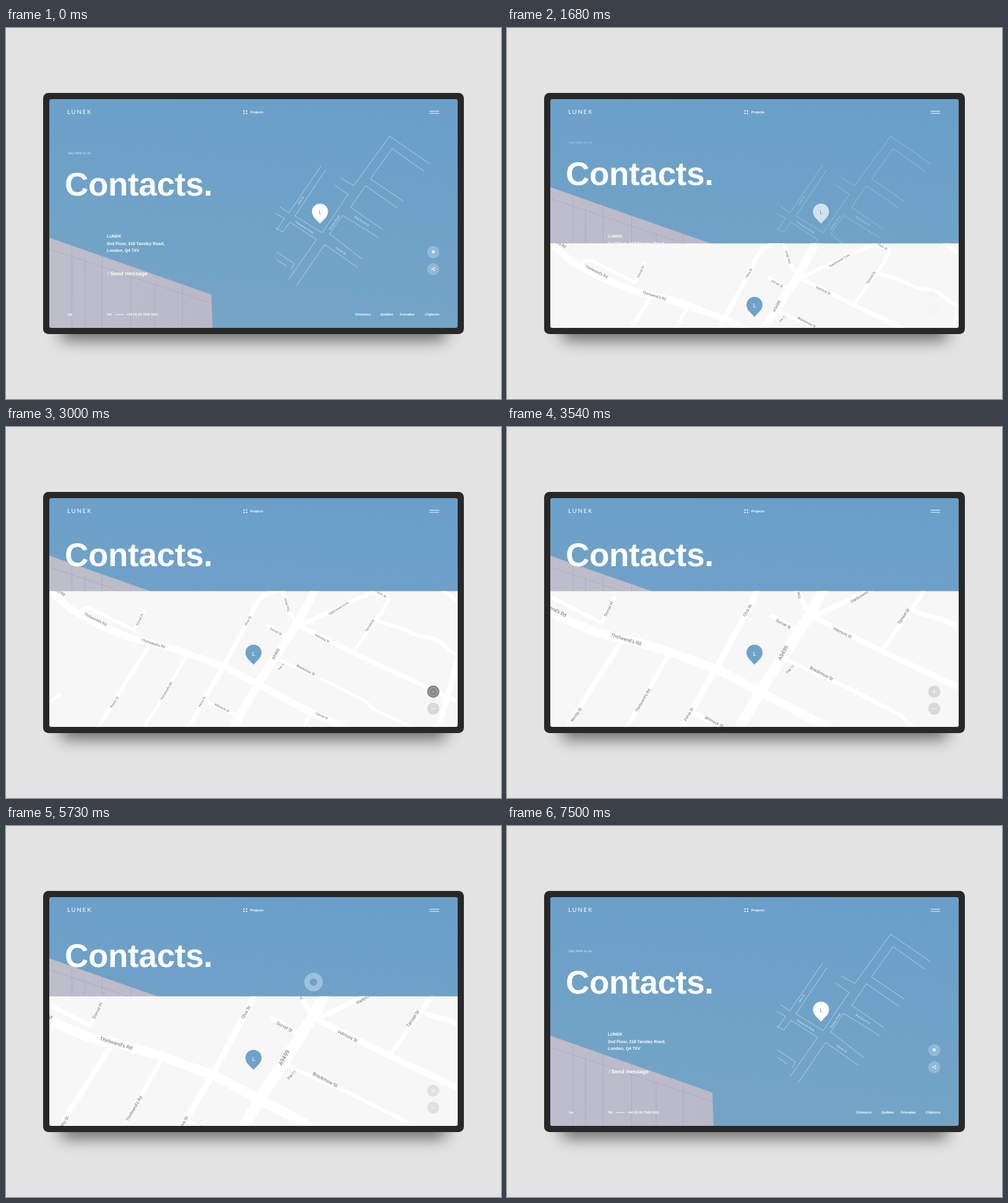
Animation, 800 px wide and 600 px high, one loop 8.1 s. Source, as an HTML page:

```html
<!DOCTYPE html>
<html lang="en">
<head>
<meta charset="utf-8">
<title>Contacts</title>
<style>
  html, body { margin: 0; width: 100%; height: 100%; overflow: hidden; background: #e3e3e3; }
  svg { display: block; width: 800px; height: 600px; text-rendering: geometricPrecision; }
  text { font-family: "Liberation Sans", Arial, sans-serif; }
  .ui { fill: #fff; font-weight: bold; }
  .mini path { fill: none; stroke: #fff; stroke-width: .75; opacity: .62; }
  .mini text { fill: #fff; opacity: .8; font-size: 4.6px; text-anchor: middle; }
  .roads { fill: none; stroke: #fff; stroke-linejoin: round; stroke-linecap: round; }
  .names text { font-family: Roboto, sans-serif; fill: #6c6c6c; text-anchor: middle; }
  .initial { font: 9px Lato, sans-serif; text-anchor: middle; }
  .seams path { fill: none; stroke: #a09fb2; stroke-width: .7; opacity: .75; }
</style>
</head>
<body>
<svg viewBox="0 0 800 600">
  <defs>
    <linearGradient id="sky" x1=".65" y1="0" x2=".45" y2="1">
      <stop offset="0" stop-color="#6a9fc9"/>
      <stop offset="1" stop-color="#74a5c6"/>
    </linearGradient>
    <linearGradient id="wall" x1="0" y1="0" x2="1" y2="0">
      <stop offset="0" stop-color="#bebdcc"/>
      <stop offset="1" stop-color="#b9b9c8"/>
    </linearGradient>
    <filter id="soft" x="-20%" y="-100%" width="140%" height="300%"><feGaussianBlur stdDeviation="13 12"/></filter>
    <clipPath id="screen"><rect x="70" y="115" width="660" height="370" rx="3.5"/></clipPath>
    <path id="pin" d="M0 19.5C-4 14-13 9-13 0A13 13 0 0 1 13 0C13 9 4 14 0 19.5Z"/>
  </defs>

  <rect width="800" height="600" fill="#e3e3e3"/>
  <rect x="88" y="440" width="624" height="66" rx="10" fill="#000" opacity=".5" filter="url(#soft)"/>
  <rect x="60" y="105" width="680" height="390" rx="8.5" fill="#282828"/>

  <g clip-path="url(#screen)">
    <rect x="70" y="115" width="660" height="370" fill="url(#sky)"/>

    <g id="building">
      <path d="M70 339L332 431L334 486H70Z" fill="url(#wall)"/>
      <g class="seams">
        <path d="M70 357.5L333 446"/>
        <path d="M106.500 352V486M127 372V486M155.500 369V486M201.500 385V486M241 414V486M285 414V486"/>
        <path d="M70 339L332 431" stroke="#d2d1dc"/>
        <path d="M332 431L334 486" stroke="#d2d1dc"/>
      </g>
    </g>

    <g class="mini">
      <g id="streets"></g>
      <g id="whitePin" transform="translate(507.500 297)">
        <use href="#pin" fill="#fff"/>
        <text class="initial" y="4" style="font-size:9px;opacity:1;fill:#6fa2c8">L</text>
      </g>
    </g>

    <g class="ui">
      <g font-size="6.8">
        <text x="163" y="339">LUNEK</text>
        <text x="163" y="350.800">2nd Floor, 318 Tansley Road,</text>
        <text x="163" y="362.200">London, Q4 7XV</text>
      </g>
      <text x="164" y="400" font-size="8.600"><tspan font-weight="normal">/</tspan> Send message</text>
      <g font-size="5.400">
        <text x="100" y="465.400">Up</text>
        <text x="163" y="465.400">Tel.</text>
        <rect x="176.500" y="463" width="14" height=".8"/>
        <text x="194.500" y="465.400">+44 (0) 20 7946 0321</text>
        <text x="564" y="465.400">Glimtaros</text>
        <text x="605" y="465.400">Quibbet</text>
        <text x="636.500" y="465.400">Friendow</text>
        <text x="677" y="465.400">Clipboria</text>
      </g>
      <g opacity=".24"><circle cx="690.500" cy="362.500" r="9.800"/><circle cx="690.500" cy="390" r="9.800"/></g>
      <use href="#pin" transform="translate(690.500 361.700) scale(.17)"/>
      <circle cx="690.500" cy="361.700" r=".7" fill="#86aecb"/>
      <path d="M692.500 388L688.700 390L692.500 392" fill="none" stroke="#fff" stroke-width=".6"/>
      <circle cx="688.700" cy="390" r="1.100"/><circle cx="692.400" cy="388" r="1.100"/><circle cx="692.400" cy="392" r="1.100"/>
    </g>

    <text id="hello" x="99.500" y="204" font-size="5.700" fill="#fff">Say hello to us</text>
    <text id="title" class="ui" x="95" y="271" font-size="53" letter-spacing="-.3">Contacts.</text>

    <g class="ui">
      <text x="99" y="139.400" style="font:9.600px Lato,sans-serif;letter-spacing:1.900px">LUNEK</text>
      <circle cx="384.700" cy="134.200" r="1.100"/><circle cx="388.800" cy="134.200" r="1.100"/>
      <circle cx="384.700" cy="138.200" r="1.100"/><circle cx="388.800" cy="138.200" r="1.100"/>
      <text x="394.700" y="138" font-size="5.400">Projects</text>
      <path d="M684.500 134.500H700M684.500 138H700" stroke="#fff" stroke-width=".9"/>
    </g>

    <g id="panel">
      <rect x="70" y="265.500" width="660" height="222" fill="#f7f7f7"/>
      <svg x="70" y="265.500" width="660" height="222" viewBox="70 265.500 660 222" style="width:660px;height:222px">
        <g id="map"><g class="roads"></g><g class="names"></g></g>
      </svg>
      <use href="#pin" x="400" y="365" fill="#6fa2c8"/>
      <text class="initial" x="400" y="369.500" fill="#fff">L</text>
    </g>

    <g id="zoom">
      <circle cx="690.500" cy="428" r="9.800" fill="#d9d9d9"/>
      <circle cx="690.500" cy="455.500" r="9.800" fill="#d9d9d9"/>
      <path d="M687 428H694M690.500 424.500V431.500M687 455.500H694" stroke="#fff" stroke-width=".8"/>
    </g>

    <g id="cursor">
      <circle id="halo" fill="none"/>
      <circle id="rim" r="6.500" fill="none" stroke="#fff" stroke-width=".7" opacity=".9"/>
    </g>
  </g>
</svg>

<script>
const LOOP = 8100;
const $ = id => document.getElementById(id);
const NS = "http://www.w3.org/2000/svg";

function add(parent, tag, attrs, text = "") {
  const el = document.createElementNS(NS, tag);
  for (const key in attrs) el.setAttribute(key, attrs[key]);
  el.textContent = text;
  parent.append(el);
}

function label(parent, text, x, y, angle, size) {
  add(parent, "text", { transform: `translate(${x} ${y}) rotate(${angle})`, y: size * .35, "font-size": size }, text);
}

// Line plan on the sky
[
  "510 222L457 299L442 289", "517 229L467 304L511 331L553 269L531 254",
  "540 242L562 255L620 175L685 220", "676 232L624 195L589 244L642 280",
  "634 292L581 255L557 290L609 326", "602 339L544 303L523 333L576 374",
  "568 387L515 350L470 416", "457 406L502 342L459 314L447 330L436 323",
  "436 300L450 308L437 327", "437 362L466 381L461 391", "437 374L453 385"
].forEach(d => add($("streets"), "path", { d: "M" + d }));

[
  ["Olva St", 476, 279, -56], ["Thirlwends Road", 482, 322, 32],
  ["Tansley Road", 530.5, 315, -56], ["Brackmow St", 575, 312, 33], ["Garvet St", 541, 360, 35]
].forEach(l => label($("streets"), ...l, 4.6));

// Street map: width, then path
[
  [11, "60 258L78 272L105 295L150 320L203 342L250 353L290 365L356 389L407 416L480 455L555 491"],
  [13, "504 256L471 317L407 416L363 494"],
  [7, "292 494L312 455L352 386L396 305Q405 276 425 268L450 260"],
  [5, "291 370L243 455L228 476L222 492"],
  [6, "232 353L188 422L144 494"],
  [5, "116 304Q125 288 138 294L207 329L223 298"],
  [5, "66 448L86 434"],
  [6, "423 321L452 338"],
  [6, "446 258L453 290L471 320"],
  [6, "473 322L520 300L560 281L592 268L616 274"],
  [7, "473 321L561 365L641 403L734 446"],
  [5, "561 364L608 298L618 280"],
  [6, "597 313L619 320Q645 327 654 333T690 341Q707 350 716 361L734 371"],
  [6, "696 258Q715 268 734 287"],
  [4.5, "436 374L517 411L582 444L593 456L640 478L670 492"],
  [6, "323 443L380 469"],
  [5, "492 462L478 492"],
  [9, "734 362L697 494"]
].forEach(([width, d]) => add(document.querySelector(".roads"), "path", { d: "M" + d, "stroke-width": width }));

[
  ["Thirlwend's Rd", 78, 261, 32, 6.2], ["Thirlwend's Rd", 144.5, 311, 27, 6.2], ["Thirlwend's Rd", 238, 350, 17, 6.2],
  ["Dorvel Pl", 216, 311.5, -63, 5.2], ["Olva St", 391, 313.5, -60, 5.4], ["The Ulmo", 454, 288, -108, 5.2],
  ["Dorvel St", 436.5, 330.5, 29, 5.2], ["A9499", 436, 367, -61, 6.8], ["Flat 11", 445, 387.5, -47, 4.2],
  ["Harbrowen Cres", 537.5, 293, -31, 5.2], ["Velmora St", 511, 341.5, 27, 5.3], ["Tamsel St", 588, 321, -56, 5.2],
  ["Jorin St", 607, 270.5, 31, 5], ["Brackmow St", 484.5, 393, 28, 5.5], ["Noxby St", 175, 445, -55, 5.2],
  ["Thirlwend's Rd", 259, 427, -60, 5.2], ["Pelve St", 317, 444.5, -60, 5.2], ["Wilmock St", 349, 454, 27, 5.2],
  ["Garvet St", 510.5, 467, 25, 5.2]
].forEach(l => label(document.querySelector(".names"), ...l));

const ramp = (t, start, length) => Math.min(1, Math.max(0, (t - start) / length));
const quart = u => u < .5 ? 8 * u ** 4 : 1 - 8 * (1 - u) ** 4;
const glide = (t, start, length) => quart(ramp(t, start, length));
const mix = (a, b, u) => a + (b - a) * u;

const visits = [
  { from: [590, 380], to: [507, 300], start: 360, press: 1140, color: "#fff", alpha: .34 },
  { from: [610, 375], to: [690.5, 428], start: 2560, press: 2920, color: "#000", alpha: .38 },
  { from: [590, 345], to: [497, 252.5], start: 4760, press: 5545, color: "#fff", alpha: .34 }
];

function drawCursor(t) {
  const visit = visits.find(v => t >= v.start && t < v.press + 400);
  $("cursor").style.display = visit ? "" : "none";
  if (!visit) return;
  const { from, to, start, press, color, alpha } = visit;
  const move = 1 - (1 - ramp(t, start, press - start - 40)) ** 3;
  const grow = ramp(t, press, 180);
  const outer = 6 + 9 * grow;
  const hole = Math.max(0, 10 * (grow - .4));
  $("cursor").setAttribute("transform", `translate(${mix(from[0], to[0], move)} ${mix(from[1], to[1], move)})`);
  $("cursor").style.opacity = ramp(t, start, 180) * (1 - ramp(t, press + 190, 180));
  const halo = $("halo");
  halo.setAttribute("r", (outer + hole) / 2);
  halo.setAttribute("stroke-width", outer - hole);
  halo.setAttribute("stroke", color);
  halo.setAttribute("stroke-opacity", alpha);
  $("rim").style.opacity = color === "#000" && grow > 0 ? .5 * (1 - ramp(grow, .5, .5)) : 0;
}

function draw(t) {
  const open = glide(t, 1259, 790) - glide(t, 5514, 790);
  const rise = glide(t, 1313, 790) - glide(t, 5494, 790);
  const shift = (id, y) => $(id).setAttribute("transform", `translate(0 ${y})`);
  shift("panel", 220 * (1 - open));
  shift("building", -131 * open);
  shift("title", -46 * rise);
  shift("hello", -46 * rise);
  $("hello").style.opacity = .75 * Math.max(0, 1 - 1.3 * rise);
  $("streets").style.opacity = 1 - ramp(t, 1500, 500) + ramp(t, 5850, 600);
  $("whitePin").style.opacity = 1 - ramp(t, 1550, 430) + ramp(t, 5900, 650);
  $("zoom").style.opacity = ramp(t, 1650, 550) - ramp(t, 5650, 280);

  const scale = t < 6500 ? 1 + .37 * glide(t, 3080, 790) : 1;
  $("map").setAttribute("transform", `translate(400 373.5) scale(${scale}) translate(-400 -373.5)`);
  drawCursor(t);
}

const began = performance.now();
function tick() {
  draw((performance.now() - began) % LOOP);
  requestAnimationFrame(tick);
}
tick();
</script>
</body>
</html>
```
